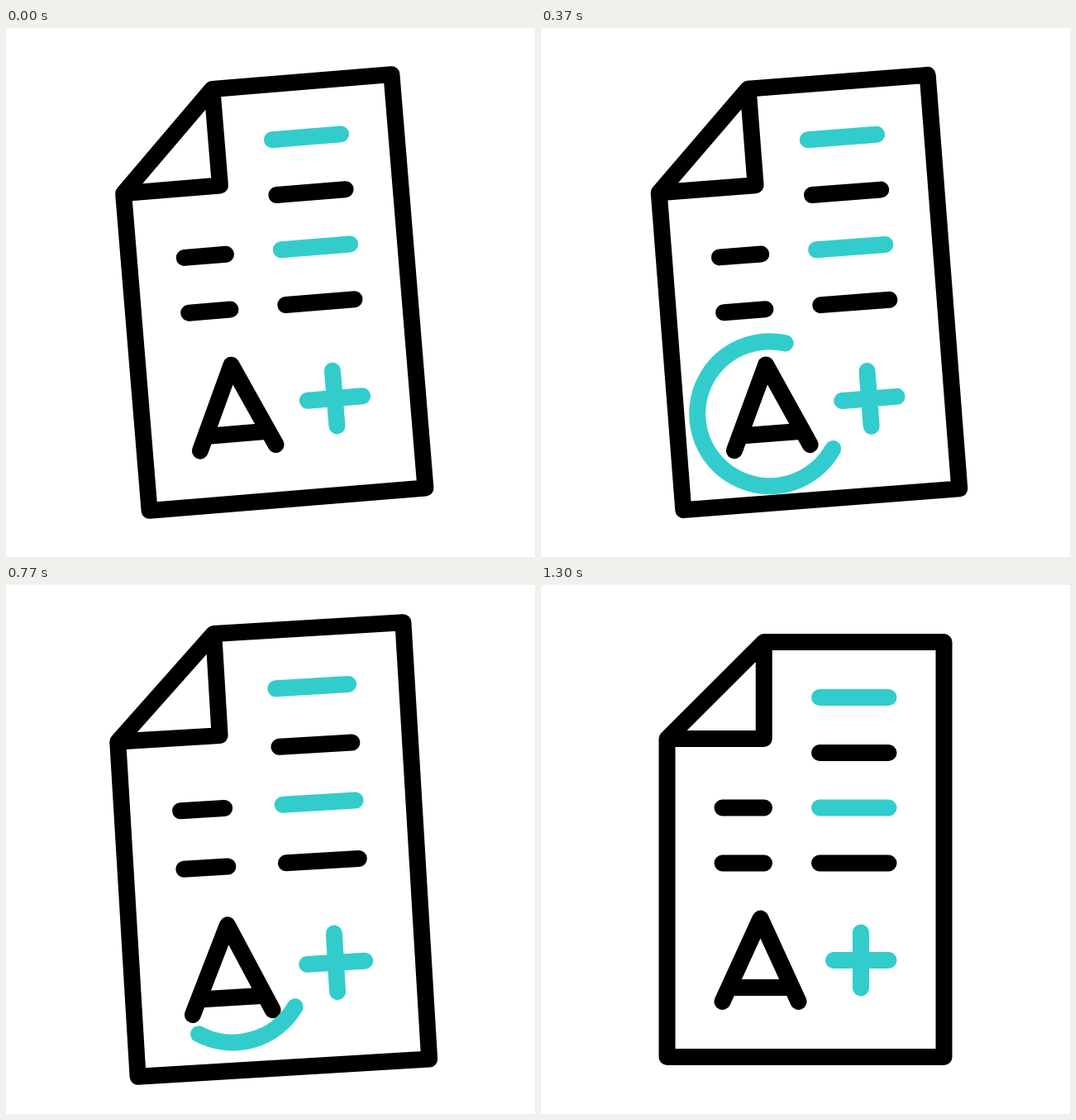
Animation, 640 px wide and 640 px high, one loop 1670 ms. Source, as an HTML page with a canvas:

```html
<!DOCTYPE html>
<html>
<head>
<meta charset="utf-8">
<style>
  html, body { margin: 0; width: 100%; height: 100%; overflow: hidden; background: #fff; }
  canvas { display: block; width: 100vw; height: 100vh; object-fit: contain; }
</style>
</head>
<body>
<canvas id="stage" width="640" height="640"></canvas>
<script>
const ctx = document.getElementById('stage').getContext('2d');
const LOOP = 1670, LAST = 39, CENTER = 320, WEIGHT = 20;
const BLACK = '#000', TEAL = '#33cccc';

// Keys are [time in 1/30 s, value], eased in and out.
const TILT = [[-3.1, 0], [6.7, -19.8], [14.1, 5], [21.6, -4], [29, 2], [34.4, 0]];
const ZOOM = [[17.5, 1], [28.1, 1.103], [38.7, 1]];
const RING_TURN = [[3.2, 0], [26.8, 130.5]];
const RING_HEAD = [[3, 0], [15.5, 360]];
const RING_TAIL = [[13.5, 0], [27.5, 360]];

function valueAt(keys, t) {
  if (t <= keys[0][0]) return keys[0][1];
  for (let i = 1; i < keys.length; i++) {
    const [t0, v0] = keys[i - 1], [t1, v1] = keys[i];
    if (t < t1) {
      const u = (t - t0) / (t1 - t0);
      return v0 + (v1 - v0) * u * u * (3 - 2 * u);
    }
  }
  return keys[keys.length - 1][1];
}

const rad = deg => deg * Math.PI / 180;

function line(color, ...xy) {
  ctx.strokeStyle = color;
  ctx.beginPath();
  for (let i = 0; i < xy.length; i += 2) ctx.lineTo(xy[i], xy[i + 1]);
  ctx.stroke();
}

function drawPage() {
  line(BLACK, 152.5, 186, 269.75, 69, 487.5, 69, 487.5, 571, 152.5, 571, 152.5, 186,
    269.75, 186, 269.75, 69);
  [136, 203, 269.5, 336.5].forEach((y, i) => {
    line(i % 2 ? BLACK : TEAL, 337, y, 420.5, y);
    if (i > 1) line(BLACK, 219.5, y, 270, y);
  });
  line(BLACK, 219.5, 504, 265.5, 403.5, 311.5, 504);
  line(BLACK, 228, 487, 303, 487);
  line(TEAL, 387, 420.5, 387, 487.5);
  line(TEAL, 354, 454, 420.5, 454);
}

function drawRing(t) {
  const turn = valueAt(RING_TURN, t);
  const tail = valueAt(RING_TAIL, t), head = valueAt(RING_HEAD, t);
  if (head - tail < 0.1) return;
  ctx.strokeStyle = TEAL;
  ctx.beginPath();
  ctx.arc(265.5, 463, 87.5, rad(turn + tail), rad(turn + head));
  ctx.stroke();
}

function draw(t) {
  const zoom = valueAt(ZOOM, t);
  ctx.setTransform(1, 0, 0, 1, 0, 0);
  ctx.fillStyle = '#fff';
  ctx.fillRect(0, 0, 640, 640);
  ctx.lineCap = ctx.lineJoin = 'round';
  ctx.translate(CENTER, CENTER);
  ctx.rotate(rad(valueAt(TILT, t)));

  // The page zooms with a constant line weight; the ring only tilts.
  ctx.save();
  ctx.scale(zoom, zoom);
  ctx.translate(-CENTER, -CENTER);
  ctx.lineWidth = WEIGHT / zoom;
  drawPage();
  ctx.restore();

  ctx.translate(-CENTER, -CENTER);
  ctx.lineWidth = WEIGHT;
  drawRing(t);
}

// 30 steps per second, with step times rounded to 10 ms.
function stepAt(ms) {
  return Math.min(LAST, Math.ceil((Math.floor(ms / 10) + 0.5) * 0.3) - 1);
}

function tick() {
  draw(stepAt(performance.now() % LOOP));
  requestAnimationFrame(tick);
}
tick();
</script>
</body>
</html>
```
